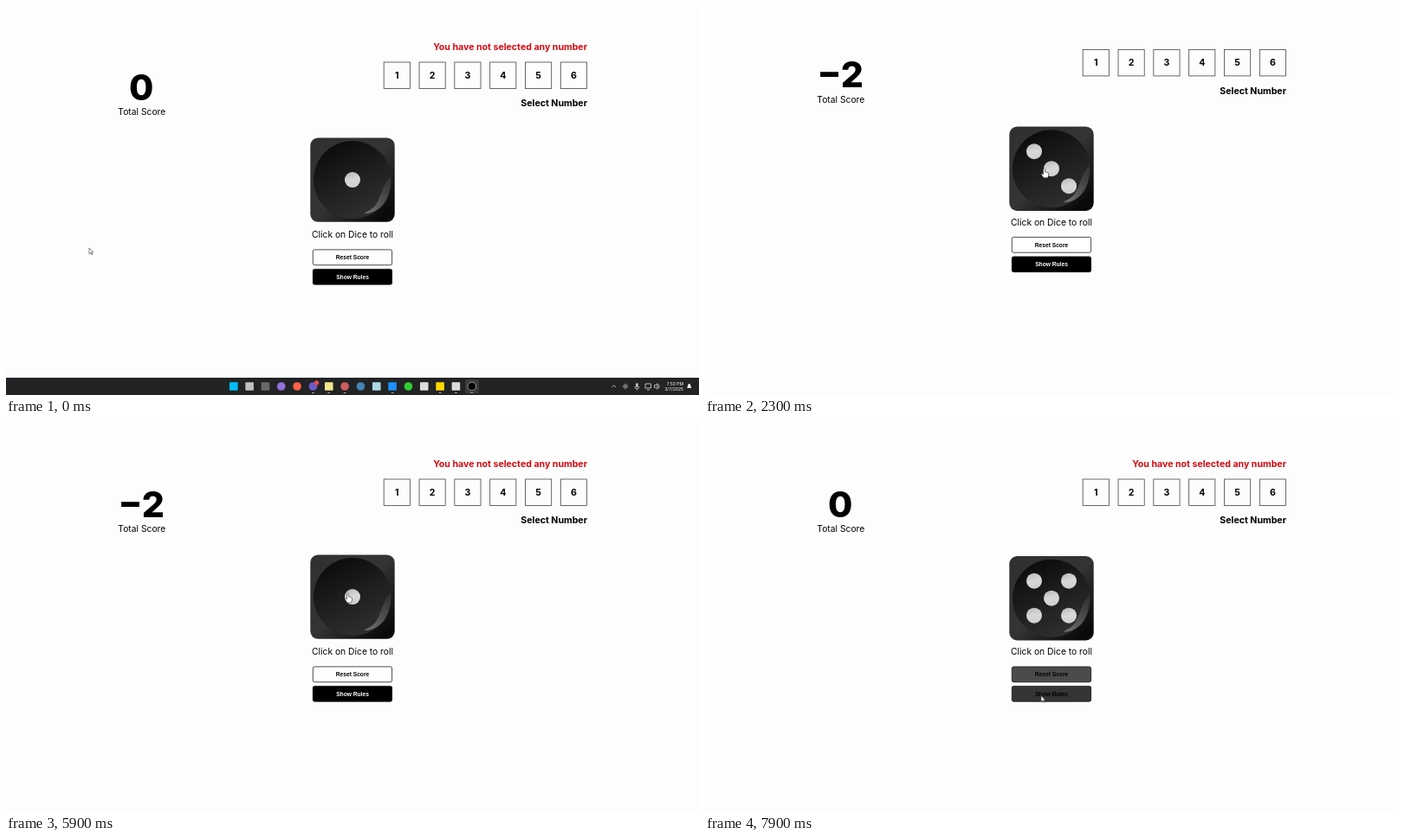
Animation of 800x450 px, one loop 8000 ms. Source, as an HTML page:

```html
<!DOCTYPE html>
<html lang="en">
<head>
<meta charset="utf-8">
<title>Dice game</title>
<style>
  html, body { margin: 0; width: 100%; height: 100%; overflow: hidden; background: #fdfdfd; }
  svg { display: block; width: 800px; height: 450px; }
  text { font: 10.3px Inter, "Open Sans", sans-serif; }
  .mid { text-anchor: middle; }
  .end { text-anchor: end; }
  .bold { font-weight: 700; font-size: 10.6px; }
  #score { font-size: 41px; font-weight: 800; }
  .btn { font: bold 6.67px "Liberation Sans", Arial, sans-serif; text-anchor: middle; }
  .clock { font-size: 5px; fill: #fff; text-anchor: end; }
</style>
</head>
<body>
<svg viewBox="0 0 800 450">
  <defs>
    <linearGradient id="body" x2="1" y2="1">
      <stop stop-color="#303030"/><stop offset=".5" stop-color="#343434"/><stop offset=".9" stop-color="#0a0a0a"/>
    </linearGradient>
    <linearGradient id="bowl" x1=".2" y1="0" x2=".7" y2="1">
      <stop stop-color="#0a0a0a"/><stop offset=".5" stop-color="#1e1e1e"/><stop offset="1" stop-color="#303030"/>
    </linearGradient>
    <linearGradient id="shine" x1="1" y1="0" x2=".2" y2="1">
      <stop stop-color="#3c3c3c" stop-opacity=".5"/><stop offset="1" stop-color="#707070"/>
    </linearGradient>
    <linearGradient id="pip" x1=".35" y1="0" x2=".6" y2="1">
      <stop stop-color="#bcbcbc"/><stop offset=".5" stop-color="#d8d8d8"/><stop offset="1" stop-color="#cecece"/>
    </linearGradient>
  </defs>

  <text id="error" class="end bold" x="671" y="51" fill="#d00c14">You have not selected any number</text>
  <g id="page">
    <text id="score" class="mid" x="156.2" y="108.5"></text>
    <text class="mid" x="156.8" y="126.3">Total Score</text>
    <g id="boxes"></g>
    <rect id="caret" x="449.2" y="73" width=".8" height="14"/>
    <text class="end bold" x="671" y="116.3">Select Number</text>
    <g id="dice">
      <rect x="-48.7" y="-48.7" width="97.4" height="97.4" rx="9" fill="url(#body)"/>
      <circle r="45" fill="url(#bowl)"/>
      <path d="M44 -4C45 22 34 38 14 39C16 36 21 36 26 30C33 22 34 6 44 -4Z" fill="url(#shine)"/>
      <g id="pips" fill="url(#pip)"></g>
    </g>
    <text class="mid" x="400" y="268.2">Click on Dice to roll</text>
    <g stroke="#000" stroke-width=".7">
      <rect id="reset" x="354.3" y="281.9" width="91.3" height="17.8" rx="2"/>
      <rect id="rules" x="354.3" y="304.4" width="91.3" height="17.8" rx="2"/>
    </g>
    <text id="resetText" class="btn" x="400" y="293.4">Reset Score</text>
    <text id="rulesText" class="btn" x="400" y="315.7">Show Rules</text>
  </g>

  <g id="taskbar">
    <rect y="430" width="800" height="20" fill="#222325"/>
    <rect x="530" y="432" width="16" height="16" rx="2" fill="#3a3b3d"/>
    <g id="icons"></g>
    <circle cx="358.5" cy="436" r="2.7" fill="#e8484a"/>
    <g fill="none" stroke="#ddd" stroke-width=".8">
      <path d="M699.5 441l2.2-2.2 2.2 2.2M738 437h6.5v5H738zM740 444h3M748.5 438.6h1.5l2-1.8v6.4l-2-1.8h-1.5zM753.4 437.8q1.4 2.2 0 4.4M726 440q0 3 2.4 3t2.4-3M728.4 443v1.5"/>
      <circle cx="715" cy="440" r="1.5"/><circle cx="715" cy="440" r="3" stroke-dasharray=".8 1.55"/>
    </g>
    <rect x="727.3" y="436.2" width="2.2" height="5" rx="1.1" fill="#ddd"/>
    <path d="M786 442q1-1 1-3q0-2 1.7-2t1.7 2q0 2 1 3zM787.7 442.7h2z" fill="#eee"/>
    <text class="clock" x="782" y="438.6">7:50 PM</text>
    <text class="clock" x="782" y="445.2">3/7/2025</text>
  </g>

  <g id="cursor" fill="#fff" stroke="#333" stroke-width=".6" stroke-linejoin="round">
    <path id="arrow" d="M0 0V6.8L1.6 5.4L2.7 7.9L3.8 7.4L2.7 5H4.8Z"/>
    <path id="hand" d="M-1 .7Q0-.7 1 .7V4L4.2 4.7Q5 5 5 6V8Q4.8 9.3 4 10.8H-.6Q-1.6 9-3.2 7Q-3.4 5.7-2.2 6L-1 7Z"/>
  </g>
</svg>
<script>
const $ = id => document.getElementById(id);
const show = (id, on) => $(id).setAttribute('visibility', on ? 'visible' : 'hidden');
const attr = (id, name, value) => $(id).setAttribute(name, value);
const move = (id, x, y) => attr(id, 'transform', `translate(${x} ${y})`);
const ramp = (t, from, to) => Math.min(1, Math.max(0, (t - from) / (to - from)));
const ease = u => u * u * (3 - 2 * u);
const gray = v => `rgb(${Array(3).fill(Math.round(v * 255))})`;

// Number boxes
for (let n = 1; n <= 6; n++) {
  const x = 395.35 + 40.83 * n;
  $('boxes').innerHTML += `<rect id="box${n}" x="${x}" y="65" width="30.2" height="30.4" fill="#fdfdfd"
    stroke="#444" stroke-width=".8"/><text id="num${n}" class="mid bold" x="${x + 15.1}" y="83.9">${n}</text>`;
}

// Taskbar icons: "o" marks round ones, "_" running ones
const icons = `deepskyblue silver dimgray mediumpurple-o tomato-o slateblue-o_ khaki-_ indianred-o_ steelblue-o
  lightblue dodgerblue-_ limegreen-o gainsboro gold-_ gainsboro-_ black-o_`;
icons.split(/\s+/).forEach((icon, i) => {
  const [fill, marks = ''] = icon.split('-');
  const x = 262.8 + 18.33 * i;
  $('icons').innerHTML += `<rect x="${x - 4.8}" y="435.2" width="9.6" height="9.6" fill="${fill}"
    rx="${marks.includes('o') ? 4.8 : .8}" ${fill === 'black' ? 'stroke="#ddd" stroke-width=".6"' : ''}/>`;
  if (marks.includes('_'))
    $('icons').innerHTML += `<rect x="${x - 1.5}" y="447" width="3" height="1" rx=".5" fill="#aaa"/>`;
});

function drawDice(value) {
  const pips = [];
  if (value % 2) pips.push([0, 0]);
  if (value > 1) pips.push([-1, -1], [1, 1]);
  if (value > 3) pips.push([1, -1], [-1, 1]);
  move('dice', 400, value % 2 && value > 1 ? 202.7 : 201.1);
  $('pips').innerHTML = pips.map(([x, y]) => `<circle cx="${x * 20}" cy="${y * 20}" r="9"/>`).join('');
}

const rolls = [[0, 1], [2300, 3], [2700, 4], [4000, 5], [4400, 1], [6400, 5]]; // time, value
const moves = [ // start, end, x, y
  [100, 400, 385, 290], [400, 700, 451, 89], [950, 1200, 395, 220], [1200, 1300, 391.5, 188],
  [3850, 4150, 394.5, 197], [6600, 7100, 392.5, 299], [7150, 7300, 391, 290], [7700, 7900, 388, 315.5]
];

function cursorAt(t) {
  let x = 96, y = 280;
  for (const [start, end, toX, toY] of moves) {
    const u = ease(ramp(t, start, end));
    x += (toX - x) * u;
    y += (toY - y) * u;
  }
  return [x, y];
}

let face;
function draw(t) {
  const error = t < 800 || t >= 2600;
  const shift = error ? 0 : -14.5;
  show('error', error);
  move('page', 0, shift);
  $('score').textContent = t >= 2000 && t < 7500 ? '−2' : '0';

  const chosen = t >= 800 && t < 2000;
  attr('box1', 'fill', chosen ? '#000' : '#fdfdfd');
  attr('num1', 'fill', chosen ? '#fff' : '#000');
  attr('caret', 'fill', chosen ? '#fff' : '#333');
  show('caret', t >= 710 && Math.floor((t - 710) / 530) % 2 === 0);

  const value = rolls.filter(r => r[0] <= t).pop()[1];
  if (value !== face) drawDice(face = value);

  const [x, y] = cursorAt(t);
  const over = (left, right, top, bottom) => x > left && x < right && y > top + shift && y < bottom + shift;
  const onHand = over(436, 467, 65, 95) || over(351, 449, 152, 250);
  move('cursor', x, y);
  show('hand', onHand);
  show('arrow', !onHand);

  // Buttons invert on hover: the text at once, the fill gradually
  attr('reset', 'fill', gray(1 - ramp(t, 6950, 7325) + ramp(t, 7800, 8145)));
  attr('rules', 'fill', gray(ramp(t, 7800, 8300)));
  attr('resetText', 'fill', over(354, 446, 281, 298) ? '#fff' : '#000');
  attr('rulesText', 'fill', over(354, 446, 304, 322) ? '#000' : '#fff');

  move('taskbar', 0, 20 * ramp(t, 50, 250));
}

function tick() {
  draw(performance.now() % 8000);
  requestAnimationFrame(tick);
}
tick();
</script>
</body>
</html>
```
